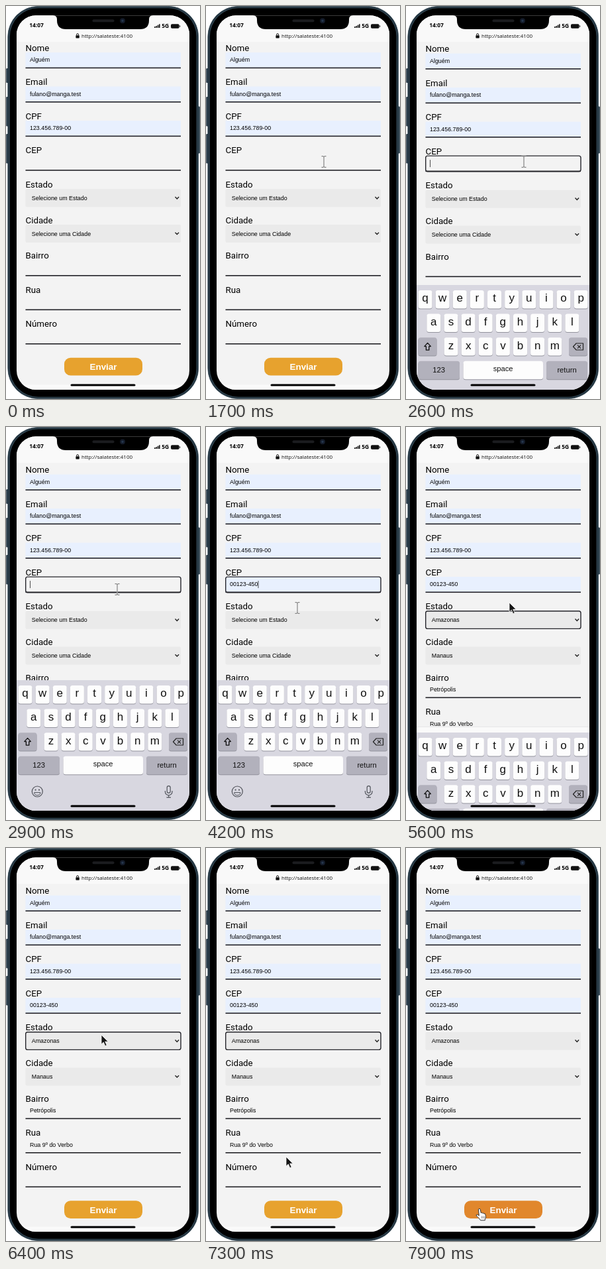
Write an HTML page that moves like this. It is 293 px wide and 593 px high and loops after 8000 ms.

```html
<!DOCTYPE html>
<html lang="pt">
<head>
<meta charset="utf-8">
<style>
html, body { margin: 0; width: 100%; height: 100%; overflow: hidden; background: #fff; }
svg { display: block; width: 293px; height: 593px; }
text { white-space: pre; }
.label { font: 13.3px Roboto, sans-serif; }
.value { font: 8.9px "Liberation Sans", Arial, sans-serif; }
.key { font: 17px "Liberation Sans", Arial, sans-serif; text-anchor: middle; fill: #111; }
.word { font: 11.2px "Liberation Sans", Arial, sans-serif; text-anchor: middle; fill: #111; }
.send { font: bold 13.4px "Liberation Sans", Arial, sans-serif; text-anchor: middle; fill: #fff; }
.clock { font: 700 8.4px "Open Sans", sans-serif; }
.url { font: 8px "Open Sans", sans-serif; fill: #111; }
</style>
</head>
<body>
<svg id="stage" viewBox="0 0 293 593"></svg>
<script>
const LOOP = 8000;
const LEFT = 29.5, WIDTH = 234.5;

const rect = (x, y, w, h, fill, r = 0, extra = '') =>
  `<rect x="${x}" y="${y}" width="${w}" height="${h}" rx="${r}" fill="${fill}" ${extra}/>`;
const text = (cls, x, y, s, extra = '') =>
  `<text class="${cls}" x="${x}" y="${y}" ${extra}>${s}</text>`;
const dot = (x, y, r, fill) => `<circle cx="${x}" cy="${y}" r="${r}" fill="${fill}"/>`;
const path = (d, extra) => `<path d="${d}" ${extra}/>`;
const line = (d, color, w, extra = '') =>
  path(d, `fill="none" stroke="${color}" stroke-width="${w}" ${extra}`);

// Form rows: id, label, label baseline, first value
const rows = [
  ['name', 'Nome', 67.8, 'Alguém'],
  ['mail', 'Email', 119.2, 'fulano@manga.test'],
  ['cpf', 'CPF', 170.8, '123.456.789-00'],
  ['cep', 'CEP', 222.2, ''],
  ['state', 'Estado', 273.9, 'Selecione um Estado'],
  ['city', 'Cidade', 327.6, 'Selecione uma Cidade'],
  ['area', 'Bairro', 381.2, ''],
  ['street', 'Rua', 432.7, ''],
  ['number', 'Número', 484.2, '']
];
const isSelect = id => id === 'state' || id === 'city';

function row([id, label, y, value]) {
  const title = text('label', LEFT, y, label);
  const ring = h => rect(LEFT + .2, y + 2.4, WIDTH - .2, h, 'none', 3,
    `id="${id}-ring" stroke="#25252b" stroke-width="1.4"`);
  if (isSelect(id)) {
    return rect(LEFT, y + 2.3, WIDTH, 27, '#eaeaea', 2) + title +
      text('value', 38.8, y + 18.9, value, `id="${id}"`) +
      line(`M255.5 ${y + 14.2}l2.8 2.8 2.8 -2.8`, '#222', 1.4) + ring(26.6);
  }
  return rect(LEFT, y + 2.3, WIDTH, 23.6, '#e8f0fe', 0, `id="${id}-fill" opacity="${value ? 1 : 0}"`) +
    title + text('value', 36, y + 16.4, value, `id="${id}"`) +
    rect(LEFT, y + 24.8, WIDTH, 1.6, '#222227') + ring(23.6);
}

function keyCap(x, y, w, fill) {
  return rect(x, y + 1, w, 27.4, '#93939d', 3.5) + rect(x, y, w, 27.4, fill, 3.5);
}

function letters(s, x, y) {
  return [...s].map((c, i) => {
    const cx = x + i * 26.13;
    return keyCap(cx - 10.5, y, 21, '#fdfdfd') + text('key', cx, y + 17.4, c);
  }).join('');
}

// Drawn with its top edge at zero
function keyboard() {
  const gray = '#b2b1bc', ink = '#50535a';
  return rect(16, 0, 261, 240, '#d8d7e0') +
    letters('qwertyuiop', 29, 8) + letters('asdfghjkl', 41.8, 43.6) + letters('zxcvbnm', 68, 79.2) +
    keyCap(18.5, 79.2, 28, gray) + keyCap(246, 79.2, 28, gray) +
    line('M32.6 87.4l4.8 5.2h-2.6v5.6h-4.4v-5.6h-2.600z', '#111', 1.3, 'stroke-linejoin="round"') +
    line('M252.5 93l4.6-5h10.4v10h-10.4z', '#222', 1.2, 'stroke-linejoin="round"') +
    line('M259 90.6l5 5m0-5l-5 5', '#222', 1.2) +
    keyCap(18.5, 114.8, 62.5, gray) + keyCap(86.5, 114.8, 120.5, '#fdfdfd') + keyCap(212, 114.8, 62, gray) +
    text('word', 49.7, 132.2, '123') + text('word', 146.6, 129.8, 'space') + text('word', 243, 132.2, 'return') +
    rect(39.3, 160, 16, 16, 'none', 8, `stroke="${ink}" stroke-width="1.2"`) +
    dot(44.6, 165.6, 1.1, ink) + dot(50, 165.6, 1.1, ink) +
    line('M42.6 169.6h9.4a4.7 4.2 0 0 1-9.4 0z', ink, 1) +
    rect(243.2, 159.6, 5, 10.6, 'none', 2.5, `stroke="${ink}" stroke-width="1.2"`) +
    line('M240.4 167v1.4a5.3 5.3 0 0 0 10.6 0V167M245.7 173.6v3.2M242.4 176.9h6.6', ink, 1.2);
}

function frame() {
  const side = '#243643';
  return [94, 137, 193].map((y, i) => rect(.3, y, 4, i ? 44.5 : 22, side, 1.2)).join('') +
    rect(289, 151.5, 3.8, 71, side, 1.2) +
    rect(2.8, .4, 287.8, 592.2, '#1c2a34', 46, 'stroke="#415764" stroke-width=".8"') +
    rect(4.3, 1.9, 284.8, 589.2, '#304552', 44.5) +
    rect(5.8, 3.2, 281.8, 586.6, '#000', 43);
}

function statusBar() {
  const dots = [224, 226.4].map((x, i) => rect(x, 31 - i, 1.7, 2 + i, '#111', .4)).join('');
  const bars = [228.8, 231].map((x, i) => rect(x, 28.6 - i * 1.4, 1.6, 4.4 + i * 1.4, '#111', .4)).join('');
  return rect(16, 14, 261, 40, '#f9f9f9') +
    text('clock', 35.3, 32, '14:07') + dots + bars + text('clock', 235.2, 33.2, '5G') +
    rect(249, 27.2, 12.6, 6.6, '#111', 1.8) + rect(262.2, 29.2, 1, 2.6, '#111', .5) +
    rect(105.4, 44.2, 5.4, 4.2, '#111', .7) +
    line('M106.6 44.4v-1.2a1.5 1.5 0 0 1 3 0v1.2', '#111', 1) +
    text('url', 114, 48, 'http://salateste:4100');
}

function notch() {
  return path('M71 13h151v1q-6 .3-6 6v1.500q0 13.500-13.500 13.500h-112q-13.500 0-13.500-13.500v-1.500q0-5.700-6-6z', 'fill="#000"') +
    rect(130.5, 20.2, 33, 4, '#1b1c1f', 2) +
    dot(176, 22.2, 4, '#131a28') + dot(176, 22.2, 1.7, '#26384f');
}

const beam = 'M-3.5-8.3h2.5l1 .8 1-.8h2.5M0-7.5v15M-3.5 8.3h2.5l1-.8 1 .8h2.5';
const cursors = {
  beam: line(beam, '#fff', 2.2, 'opacity=".6"') + line(beam, '#555', .9),
  arrow: path('M0 0v14.2l3.3-3.100 2.500 5.600 2.400-1.100-2.500-5.400h4.600z',
    'fill="#151515" stroke="#fff" stroke-width=".8"'),
  hand: path('M-1.6.8q0-1.5 1.5-1.5 1.3 0 1.5 1.5l.8 4.7q1.5-.7 2.3.5 1.6-.6 2.3.7 1.9-.4 2.2 1.6l.5 3.3q.1 2-1.2 3.5v1.7h-6.8q-1.3-2.9-3.7-4.4-3-2.6-2.6-3.7.8-1.4 3.2.4l.9.7z',
    'fill="#fff" stroke="#333" stroke-width="1" stroke-linejoin="round"') +
    line('M3.5 10.5v3.5M5.6 10.5v3.5M7.7 10.5v3.5', '#555', .7)
};

const stage = document.getElementById('stage');
stage.innerHTML =
  '<defs><clipPath id="screen"><rect x="16" y="14.3" width="261" height="564.7" rx="29"/></clipPath></defs>' +
  frame() +
  '<g clip-path="url(#screen)">' + rect(16, 14, 261, 565, '#f3f3f3') +
  '<g id="page">' + rows.map(row).join('') +
  rect(36.2, 230.6, .8, 11, '#222', 0, 'id="caret"') +
  rect(88, 530.7, 118, 26.8, '#e7a22e', 9.5, 'id="button"') + text('send', 147, 549, 'Enviar') + '</g>' +
  rect(16, 571.5, 261, 8, '#fafafa') +
  '<g id="keys"><g id="strip">' + rect(16, -9, 261, 9, '#fafafa') + rect(16, -9, 261, .8, '#e2e2e4') + '</g>' +
  keyboard() + '</g>' +
  statusBar() + notch() + '</g>' +
  rect(97.5, 570.4, 98, 3.2, '#000', 1.6) +
  Object.entries(cursors).map(([k, s]) => `<g id="${k}">${s}</g>`).join('');

const el = id => document.getElementById(id);
const show = (id, on) => el(id).setAttribute('visibility', on ? 'visible' : 'hidden');
const move = (id, x, y) => el(id).setAttribute('transform', `translate(${x} ${y})`);

// Step tables: [time, ...state]
const pointer = [
  [0, 0, 0, ''],
  [1400, 258, 264, 'arrow'], [1500, 222, 246, 'beam'], [1600, 192, 238, 'beam'], [1700, 178, 235, 'beam'],
  [2900, 168, 245, 'beam'], [3000, 149, 264, 'beam'], [3100, 138, 273, 'beam'],
  [4800, 142, 276, 'arrow'], [4900, 148, 273, 'arrow'], [5000, 153, 268, 'arrow'], [5100, 156, 265, 'arrow'],
  [6400, 144, 282, 'arrow'], [6500, 139, 306, 'arrow'], [6600, 136, 332, 'arrow'], [6700, 134, 352, 'arrow'],
  [7000, 132, 372, 'arrow'], [7100, 129, 398, 'beam'], [7200, 125, 430, 'arrow'], [7300, 121, 466, 'arrow'],
  [7400, 116, 501, 'beam'], [7500, 113, 533, 'hand'], [7600, 111, 545, 'hand']
];
const keysTop = [[0, 600], [2500, 460], [2600, 421], [2700, 382], [5500, 421], [5600, 461], [5700, 520], [5800, 600]];
const caretOn = [[0, false], [2500, true], [3700, false], [4200, true], [4800, false]];
const focus = [[0, ''], [2500, 'cep'], [5100, 'state'], [7900, '']];
const buttonFill = [[0, '#e7a22e'], [7500, '#e4942d'], [7600, '#e1872c']];
const filled = { state: 'Amazonas', city: 'Manaus', area: 'Petrópolis', street: 'Rua 9º do Verbo' };

const at = (steps, t) => steps.filter(s => s[0] <= t).pop().slice(1);

function draw(t) {
  move('page', 0, t < 2500 ? 0 : 1.5);
  move('keys', 0, at(keysTop, t)[0]);
  show('strip', t >= 5400);

  const [active] = at(focus, t);
  rows.forEach(([id]) => show(id + '-ring', id === active));

  const typed = t >= 3100;
  el('cep').textContent = typed ? '00123-450' : '';
  el('cep-fill').setAttribute('opacity', typed ? 1 : 0);
  el('caret').setAttribute('x', typed ? 78.6 : 36.2);
  show('caret', at(caretOn, t)[0]);

  for (const [id, , , empty] of rows)
    if (filled[id]) el(id).textContent = t < 5400 ? empty : filled[id];

  el('button').setAttribute('fill', at(buttonFill, t)[0]);

  const [x, y, kind] = at(pointer, t);
  for (const k in cursors) {
    show(k, k === kind);
    move(k, x, y);
  }
}

const start = performance.now();
function tick() {
  draw((performance.now() - start) % LOOP);
  requestAnimationFrame(tick);
}
tick();
</script>
</body>
</html>
```
